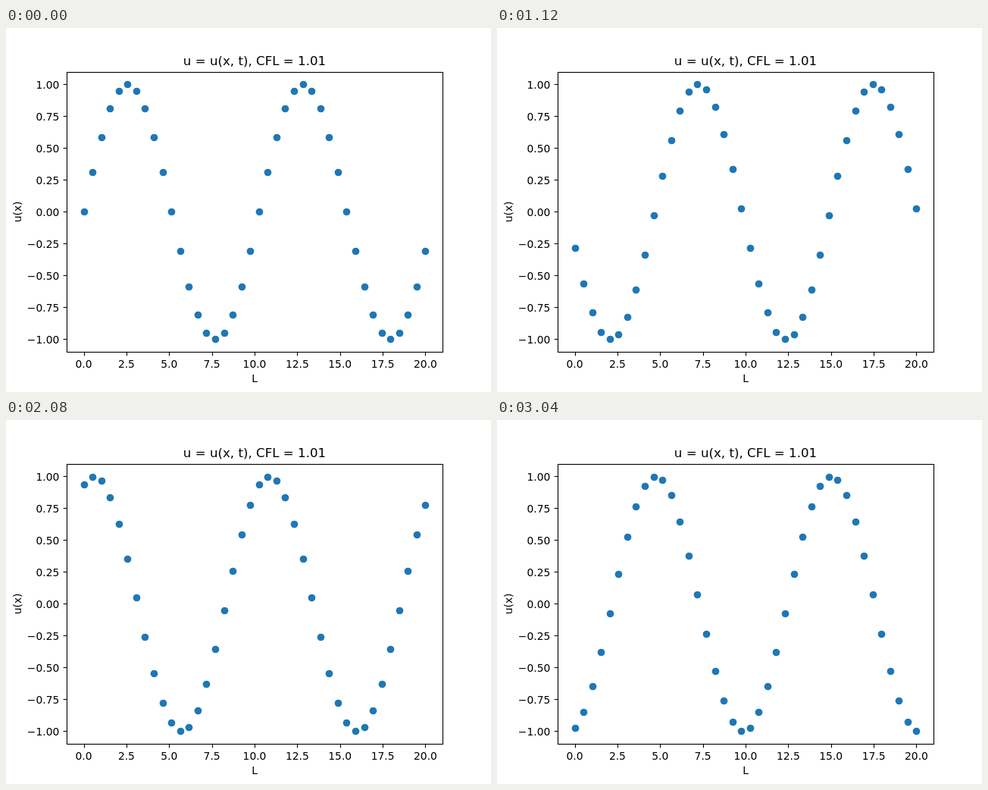
Animation of 640 by 480 pixels, one loop 3200 ms. Source, as an HTML page with a canvas:

```html
<!DOCTYPE html>
<html>
<head>
<meta charset="utf-8">
<style>
  html, body { margin: 0; width: 100%; height: 100%; overflow: hidden; background: #fff; }
  canvas { display: block; }
</style>
</head>
<body>
<canvas id="stage" width="640" height="480"></canvas>
<script>
const ctx = document.getElementById('stage').getContext('2d');
const STEP_MS = 160, STEPS = 20, POINTS = 40, PERIOD = 20, CFL = 1.01;
const LEFT = 80.5, RIGHT = 576.5, TOP = 58.5, BOTTOM = 427.5;

const snap = v => Math.floor(v + 0.5) + 0.5;
const plotX = x => 102.545 + x * 22.5455;
const plotY = u => 242.4 - u * 168;

function text(str, x, y, align = 'center', size = 13.889) {
  ctx.font = `${size}px "DejaVu Sans", sans-serif`;
  ctx.textAlign = align;
  ctx.fillText(str, x, y);
}

function line(x1, y1, x2, y2) {
  ctx.beginPath();
  ctx.moveTo(x1, y1);
  ctx.lineTo(x2, y2);
  ctx.stroke();
}

function drawAxes() {
  ctx.fillStyle = ctx.strokeStyle = '#000';
  ctx.lineWidth = 1.11;
  ctx.strokeRect(LEFT, TOP, RIGHT - LEFT, BOTTOM - TOP);
  for (let x = 0; x <= 20; x += 2.5) {
    const px = snap(plotX(x));
    line(px, BOTTOM, px, BOTTOM + 4.86);
    text(x.toFixed(1), plotX(x), 448);
  }
  for (let u = -1; u <= 1; u += 0.25) {
    const py = snap(plotY(u));
    line(LEFT, py, LEFT - 4.86, py);
    text(u.toFixed(2).replace('-', '\u2212'), 70.3, Math.round(plotY(u) + 5.28), 'right');
  }
  text('L', 328, 467);
  text('u = u(x, t), CFL = 1.01', 328, 49, 'center', 16.667);
  ctx.save();
  ctx.translate(20, 242.4);
  ctx.rotate(-Math.PI / 2);
  text('u(x)', 0, 0);
  ctx.restore();
}

function drawWave(shift) {
  ctx.fillStyle = '#1f77b4';
  for (let i = 0; i < POINTS; i++) {
    const u = Math.sin(2 * Math.PI * (i - shift) / PERIOD);
    ctx.beginPath();
    ctx.arc(snap(plotX(20 * i / (POINTS - 1))), snap(plotY(u)), 4.86, 0, 2 * Math.PI);
    ctx.fill();
  }
}

function render() {
  const step = Math.floor(performance.now() / STEP_MS) % STEPS;
  // The solver advances slightly faster than the display, skipping a step now and then.
  const solverStep = Math.floor(1.22 * step + 0.95);
  ctx.fillStyle = '#fff';
  ctx.fillRect(0, 0, 640, 480);
  drawWave(solverStep * CFL);
  drawAxes();
  requestAnimationFrame(render);
}
render();
</script>
</body>
</html>
```
